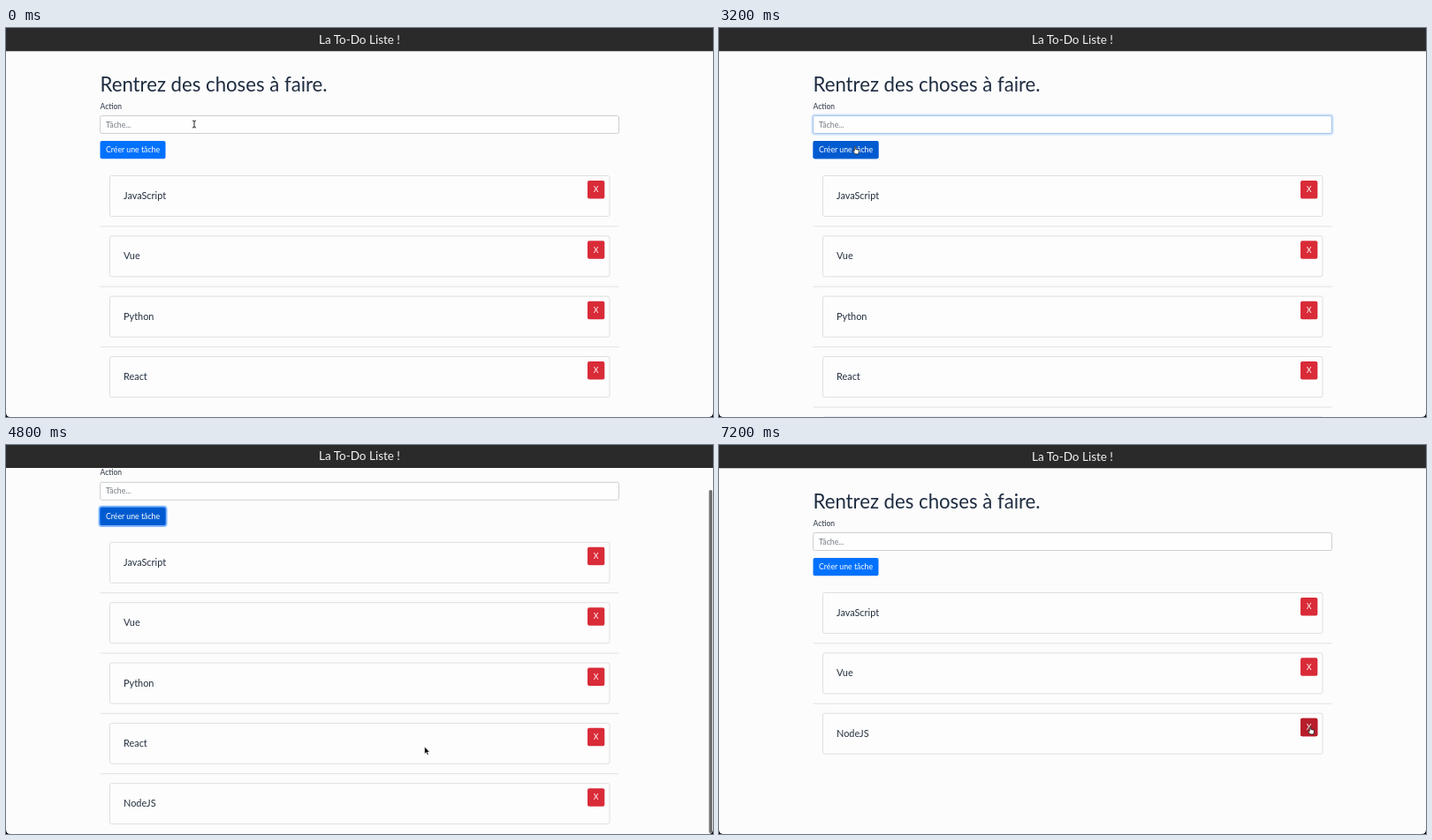
An HTML page that plays this animation: 800x441 px, repeating every 8 s.

```html
<!DOCTYPE html>
<html lang="fr">
<head>
<meta charset="utf-8">
<title>La To-Do Liste</title>
<style>
  html, body { margin: 0; width: 100%; height: 100%; overflow: hidden; background: #fcfcfc; }
  svg { display: block; width: 800px; height: 441px; font-family: Lato, "Open Sans", sans-serif; }
</style>
</head>
<body>
<svg id="stage" viewBox="0 0 800 441"></svg>
<script>
const LOOP = 8000, STEP = 100, ROW = 68.35;
const stage = document.getElementById('stage');

const ramp = (t, a, b) => Math.min(1, Math.max(0, (t - a) / (b - a)));
const ease = p => p * p * (3 - 2 * p);

// Keys are [time, ...values]; returns the values at t.
function track(keys, t, curve = p => p) {
  const i = keys.findIndex(k => k[0] > t);
  if (i === 0) return keys[0].slice(1);
  if (i < 0) return keys[keys.length - 1].slice(1);
  const a = keys[i - 1], b = keys[i], p = curve(ramp(t, a[0], b[0]));
  return a.slice(1).map((v, n) => v + (b[n + 1] - v) * p);
}

const scrollKeys = [[4200, 0], [4300, 24], [4400, 52], [4500, 57.7], [4800, 57.2], [5100, 57]];
const mouseKeys = [
  [1800, 213, 109], [2200, 154, 134.5], [3300, 154, 134.5], [3900, 473.6, 342],
  [4800, 473.6, 342], [5100, 667.6, 333], [6100, 667.6, 333], [6500, 691, 345], [6900, 669, 319.5]
];

const rect = (x, y, w, h, fill, more = '') =>
  `<rect x="${x}" y="${y}" width="${w}" height="${h}" fill="${fill}" ${more}/>`;
const text = (x, y, size, fill, str, more = '') =>
  `<text x="${x}" y="${y}" font-size="${size}" fill="${fill}" ${more}>${str}</text>`;

const pointers = {
  beam: '<path d="M-2-4Q0-4 0-2.8Q0-4 2-4M0-3V3M-2 4Q0 4 0 2.8Q0 4 2 4" fill="none" stroke="#222" stroke-width="1"/>',
  arrow: '<path d="M0 0V8.2L1.9 6.5L3.2 9.4L4.6 8.8L3.3 6H5.8Z" fill="#000" stroke="#fff" stroke-width=".6"/>',
  hand: '<path d="M-.8.3Q0-.6.7.3V3L4.2 3.7Q4.8 4 4.5 5.5L3.7 8.4H0L-2.5 5.2Q-2.4 4-.8 5Z" fill="#fff" stroke="#111" stroke-width=".8"/>'
};

function pointer(t) {
  if (t >= 600 && t < 1900) return '';
  const [x, y] = track(mouseKeys, t, ease);
  const onButton = t >= 2500 && t < 3400;
  const onCross = t >= 5000 && t < 5800 || t >= 6800;
  const kind = onButton || onCross ? 'hand' : y < 120 ? 'beam' : 'arrow';
  return `<g transform="translate(${x} ${y})">${pointers[kind]}</g>`;
}

function field(t) {
  const focus = ramp(t, 300, 500) * (1 - ramp(t, 3100, 3300));
  const value = t < 600 || t >= 3200 ? '' : t < 1200 ? 'N' : t < 1400 ? 'No' : t < 2200 ? 'Node' : 'NodeJS';
  const caret = t >= 400 && t < 3200 ? '<tspan dx="-1" fill="#222">|</tspan>' : '';
  const box = (fill, more) => rect(106.5, 99.5, 587, 20, fill, 'rx="2" ' + more);
  return rect(105.3, 98.3, 589.4, 22.4, 'none', `rx="3" stroke="#007bff" stroke-width="2" opacity="${.32 * focus}"`)
    + box(value === 'NodeJS' ? '#e8f0fe' : '#fefefe', 'stroke="#cbcfd3"')
    + box('none', `stroke="#7fb2f7" opacity="${focus}"`)
    + (value ? '' : text(113, 112.5, 8.7, '#757b82', 'Tâche...'))
    + text(113, 112.5, 8.8, '#495057', value + caret);
}

function createButton(t) {
  const left = 1 - ramp(t, 5800, 6000);
  const ring = ramp(t, 3200, 3400) * left;
  const dark = (.5 * ramp(t, 2400, 2600) + .5 * ramp(t, 3000, 3100)) * left;
  const box = (fill, more) => rect(106.5, 128, 74, 20.3, fill, 'rx="2" ' + more);
  return box('none', `stroke="#7fb6ff" stroke-width="4" opacity="${ring}"`)
    + box('#0271fd', '') + box('#005bd0', `opacity="${dark}"`)
    + text(113, 141, 8.75, '#fff', 'Créer une tâche');
}

function suggestion(t) {
  if (t < 600 || t >= 2500) return '';
  return rect(105.5, 121, 103, 28.5, '#000', 'rx="3" opacity=".2"')
    + rect(106.3, 120.5, 101.7, 27.5, '#232425', 'rx="2"')
    + (t >= 2200 ? rect(106.3, 126.5, 101.7, 15, '#47484a') : '')
    + text(113, 136.4, 6.7, '#fff', 'NodeJS', 'font-family="Inter, Roboto, sans-serif" font-weight="600"');
}

function list(t) {
  const names = ['JavaScript', 'Vue'];
  if (t < 7100) names.push('Python');
  if (t < 5800) names.push('React');
  if (t >= 3200) names.push('NodeJS');
  const hover = [0, 0, ramp(t, 6700, 6900), ramp(t, 4900, 5100) * (1 - ramp(t, 5700, 6000))];
  return names.map((name, i) => `<g transform="translate(0 ${i * ROW})">`
    + (i ? rect(106.5, 156, 587, 1, '#e2e2e2') : '')
    + rect(117.5, 167.5, 565.5, 46, '#fdfdfd', 'rx="2" stroke="#dfdfdf"')
    + text(133, 194, 10.9, '#24303f', name)
    + rect(658, 173, 19.3, 20.5, '#d92b38', 'rx="2"')
    + rect(658, 173, 19.3, 20.5, '#b71d2a', `rx="2" opacity="${hover[i] || 0}"`)
    + text(667.6, 186.3, 8.75, '#fff', 'X', 'text-anchor="middle"')
    + '</g>').join('');
}

function draw(t) {
  const scroll = t < 5800 ? track(scrollKeys, t)[0] : 0;
  const lift = Math.max(0, scroll - 57) * 1.4;
  const bar = ramp(t, 4200, 4300) * (1 - ramp(t, 5100, 5500));
  stage.innerHTML = rect(0, 0, 800, 441, '#fcfcfc')
    + `<g transform="translate(0 ${-scroll})">`
    + text(106.5, 72.3, 22.2, '#1f2d42', 'Rentrez des choses à faire.')
    + text(106.5, 91.7, 8.5, '#2c3644', 'Action')
    + field(t) + createButton(t) + list(t) + suggestion(t) + '</g>'
    + rect(0, -lift, 800, 26.3, '#2a2a2a')
    + text(400, 17.6 - lift, 13.5, '#f4f4f4', 'La To-Do Liste !', 'text-anchor="middle"')
    + rect(795.5, 1 + 50 * Math.min(1, scroll / 57), 3.7, 389, '#6d6d6d', `rx="1.8" opacity="${bar}"`)
    + pointer(t)
    + '<path d="M0 436Q0 441 5 441H0ZM800 436Q800 441 795 441H800Z"/>';
}

const start = performance.now();
let shown = -1;
function tick() {
  const t = Math.floor((performance.now() - start) % LOOP / STEP) * STEP;
  if (t !== shown) draw(shown = t);
  requestAnimationFrame(tick);
}
tick();
</script>
</body>
</html>
```
